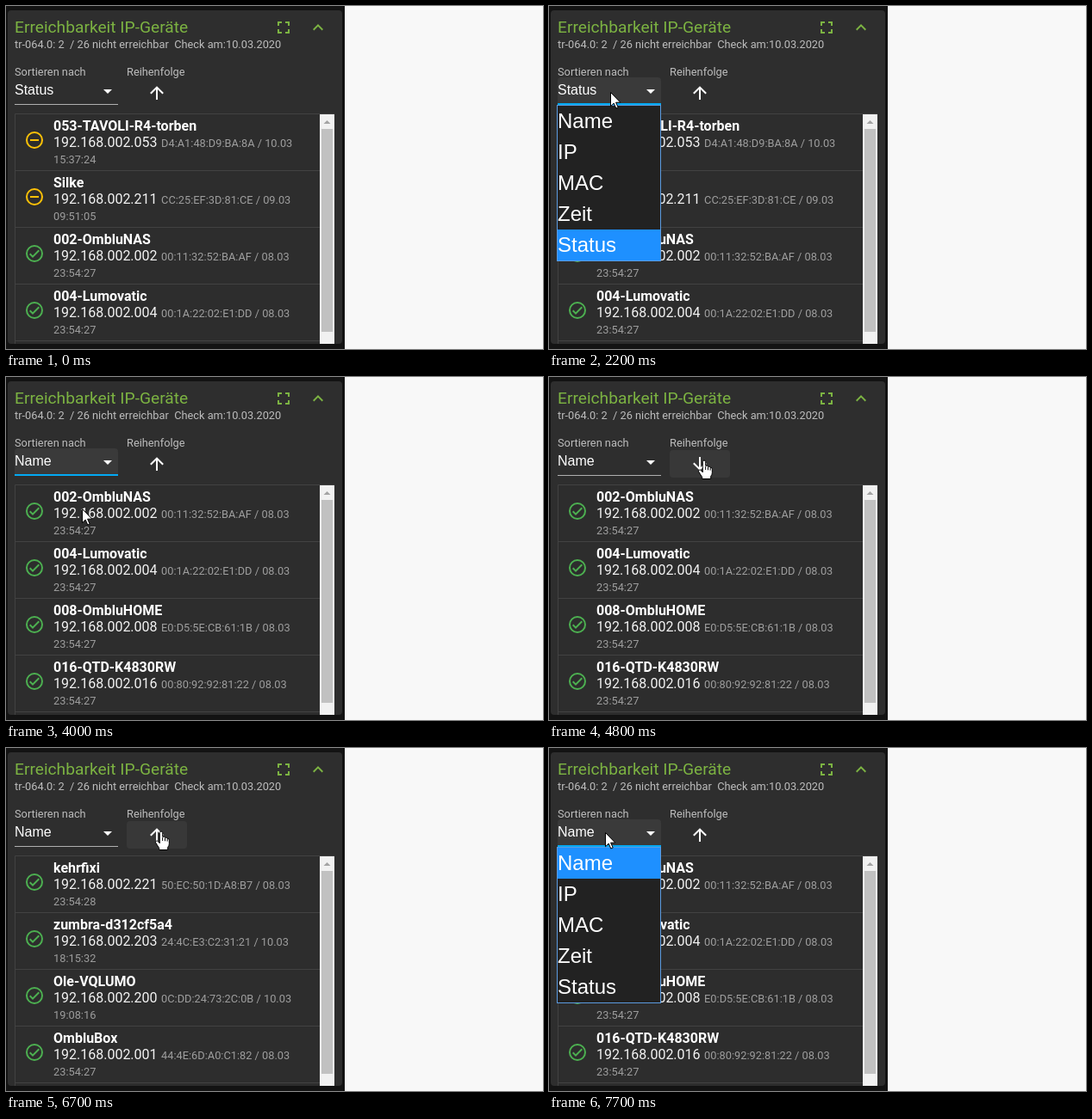
An HTML page that plays this animation: 623 px wide and 399 px high, repeating every 8 s.

```html
<!DOCTYPE html>
<html lang="de">
<head>
<meta charset="utf-8">
<title>Erreichbarkeit IP-Geräte</title>
<style>
html, body { margin: 0; width: 100%; height: 100%; overflow: hidden; background: #f8f8f8; }
svg { display: block; width: 623px; height: 399px; }
text { font-family: Roboto, sans-serif; font-size: 12.8px; fill: #bdbdbd; white-space: pre; }
.title { font-size: 19.2px; fill: #7cb342; }
.name { font-size: 16px; font-weight: 700; fill: #fff; }
.ip { font-size: 16px; fill: #f2f2f2; }
.dim { fill: #9e9e9e; }
.value { font: 16px "Liberation Sans", sans-serif; fill: #fff; }
.option { font: 24px "Liberation Sans", sans-serif; fill: #fff; }
.green { fill: #7cb342; }
.ok { color: #4caf50; }
.away { color: #ffc107; }
</style>
</head>
<body>
<svg viewBox="0 0 623 399">
  <defs>
    <clipPath id="card"><rect x="2" y="5" width="388" height="388" rx="4"/></clipPath>
    <clipPath id="button"><rect x="140" y="85" width="70" height="32" rx="4"/></clipPath>
    <g id="ok" fill="currentColor">
      <circle cx="12" cy="12" r="9" fill="none" stroke="currentColor" stroke-width="2"/>
      <path d="M16.59 7.58 10 14.17 7.41 11.59 6 13l4 4 8-8z"/>
    </g>
    <g id="away" fill="none" stroke="currentColor" stroke-width="2">
      <circle cx="12" cy="12" r="9"/>
      <path d="M7 12h10"/>
    </g>
  </defs>

  <rect width="393" height="399" fill="#131313"/>
  <g clip-path="url(#card)">
    <rect x="2" y="5" width="388" height="388" fill="#2e2e2e"/>
    <text class="title" x="10" y="31">Erreichbarkeit IP-Geräte</text>
    <text x="10" y="49">tr-064.0: 2  / 26 nicht erreichbar  Check am:10.03.2020</text>
    <path class="green" transform="translate(310 13)" d="M5 5h5v2H7v3H5zM14 5h5v5h-2V7h-3zM17 14h2v5h-5v-2h3zM10 17v2H5v-5h2v3z"/>
    <path class="green" transform="translate(350 13)" d="M7.41 15.41 12 10.83l4.59 4.58L18 14l-6-6-6 6z"/>

    <text x="10" y="81">Sortieren nach</text>
    <path id="selectFill" d="M10 115V87q0-4 4-4h112q4 0 4 4v28z" fill="#3a3a3a"/>
    <text id="value" class="value" x="10" y="103"></text>
    <path d="M113 97h10l-5 5z" fill="#fff"/>
    <rect x="10" y="114" width="120" height="1" fill="#b0b0b0"/>
    <rect id="focusLine" x="10" y="113" width="120" height="2" fill="#03a9f4"/>

    <text x="140" y="81">Reihenfolge</text>
    <g clip-path="url(#button)">
      <rect id="buttonFill" x="140" y="85" width="70" height="32" fill="#383838"/>
      <circle id="ripple" cx="175" cy="101" r="29" fill="#fff" opacity=".05"/>
    </g>
    <path id="order" d="M13 20h-2V8l-5.5 5.5-1.42-1.42L12 4.16l7.92 7.92-1.42 1.42L13 8z" fill="#fff"/>

    <rect x="10" y="125" width="371" height="270" fill="#2d2d2d"/>
    <path d="M10.5 393V125.5H381M10 191.5h354m-354 66h354m-354 66h354m-354 66h354" fill="none" stroke="#424242"/>
    <g id="lists"></g>
    <rect x="364" y="126" width="17" height="267" fill="#f1f1f1"/>
    <rect x="366" y="143" width="13" height="236" fill="#c1c1c1"/>
    <path d="M368.5 137h8l-4-4z" fill="#a3a3a3"/>
  </g>

  <g id="menu">
    <rect x="9.5" y="115.5" width="120" height="181" fill="#222" stroke="#5b9be0"/>
    <rect id="marked" x="10" width="119" height="36" fill="#1e90ff"/>
  </g>

  <path id="arrow" d="M.5.5v16.2l3.7-3.6 2.6 5.9 2.4-1-2.6-5.8h5.2z" fill="#fff" stroke="#000"/>
  <path id="hand" d="M-1.7 1.6q0-1.6 1.7-1.6t1.7 1.6V6.2q2.2-.6 2.8 1 2-.5 2.6 1 2.2-.3 2.2 2v4.3q0 2-1.6 4V21.500H-2.300V19.500L-6 13.800q-1.200-2 .3-2.700 1.300-.5 2.600 1.100L-1.700 13.800z M1.700 7v4m2.800-3.500v3.800m2.600-3v3.300" fill="#fff" stroke="#000"/>
</svg>

<script>
const LOOP = 8000, TICK = 100;
const $ = id => document.getElementById(id);

const tobias = ["away", "053-TAVOLI-R4-torben", "192.168.002.053", "D4:A1:48:D9:BA:8A / 10.03", "15:37:24"];
const silke = ["away", "Silke", "192.168.002.211", "CC:25:EF:3D:81:CE / 09.03", "09:51:05"];
const nas = ["ok", "002-OmbluNAS", "192.168.002.002", "00:11:32:52:BA:AF / 08.03", "23:54:27"];
const hub = ["ok", "004-Lumovatic", "192.168.002.004", "00:1A:22:02:E1:DD / 08.03", "23:54:27"];
const home = ["ok", "008-OmbluHOME", "192.168.002.008", "E0:D5:5E:CB:61:1B / 08.03", "23:54:27"];
const printer = ["ok", "016-QTD-K4830RW", "192.168.002.016", "00:80:92:92:81:22 / 08.03", "23:54:27"];
const vacuum = ["ok", "kehrfixi", "192.168.002.221", "50:EC:50:1D:A8:B7 / 08.03", "23:54:28"];
const speaker = ["ok", "zumbra-d312cf5a4", "192.168.002.203", "24:4C:E3:C2:31:21 / 10.03", "18:15:32"];
const laptop = ["ok", "Ole-VQLUMO", "192.168.002.200", "0C:DD:24:73:2C:0B / 10.03", "19:08:16"];
const router = ["ok", "OmbluBox", "192.168.002.001", "44:4E:6D:A0:C1:82 / 08.03", "23:54:27"];

const lists = {
  status: [tobias, silke, nas, hub],
  ascending: [nas, hub, home, printer],
  descending: [vacuum, speaker, laptop, router]
};

const row = ([icon, name, ip, mac, time], i) => `
  <g transform="translate(0 ${i * 66})">
    <use href="#${icon}" class="${icon}" x="21" y="144"/>
    <text class="name" x="55" y="145">${name}</text>
    <text class="ip" x="55" y="164">${ip}<tspan class="dim" dx="4.5" font-size="12.8" style="font-size:12.8px;fill:#9e9e9e">${mac}</tspan></text>
    <text class="dim" x="55" y="183">${time}</text>
  </g>`;

$("lists").innerHTML = Object.entries(lists)
  .map(([key, rows]) => `<g id="${key}">${rows.map(row).join("")}</g>`).join("");
$("menu").insertAdjacentHTML("beforeend", ["Name", "IP", "MAC", "Zeit", "Status"]
  .map((label, i) => `<text class="option" x="10" y="${142 + i * 36}">${label}</text>`).join(""));

// Each move: start time, then one pointer position per tick.
const moves = [
  [500, [348, 24], [335, 35], [315, 48], [292, 60], [268, 72], [240, 84], [209, 94], [170, 106], [136, 111],
    [100, 108], [78, 102], [71, 100]],
  [2700, [70, 108], [64, 122], [59, 129]],
  [3800, [62, 136], [72, 147], [88, 153], [108, 150], [128, 140], [146, 127], [160, 113], [172, 103], [180, 97]],
  [7300, [150, 102], [105, 104], [75, 100], [65, 98]]
];

const pointerAt = t => {
  const move = moves.filter(m => m[0] <= t).pop();
  if (!move) return null;
  const [start, ...points] = move;
  return points[Math.min(Math.floor((t - start) / TICK), points.length - 1)];
};
const within = (t, ...spans) => spans.some(([from, to]) => t >= from && t < to);
const inside = (p, x, y, w, h) => !!p && p[0] >= x && p[0] < x + w && p[1] >= y && p[1] < y + h;
const show = (id, on) => $(id).setAttribute("visibility", on ? "visible" : "hidden");

function draw(t) {
  const p = pointerAt(t);
  const open = within(t, [2200, 3100], [7700, LOOP]);
  const focus = within(t, [2200, 4700], [7700, LOOP]);
  const overButton = inside(p, 140, 85, 70, 32);
  const list = t < 3200 ? "status" : within(t, [4900, 6800]) ? "descending" : "ascending";

  Object.keys(lists).forEach(key => show(key, key === list));
  $("value").textContent = t < 3100 ? "Status" : "Name";
  show("selectFill", focus || inside(p, 10, 83, 120, 32));
  show("focusLine", focus);
  show("buttonFill", overButton);
  show("ripple", within(t, [4900, 5200], [6800, 7100]));
  $("order").setAttribute("transform",
    `translate(175 101) rotate(${within(t, [4800, 6700]) ? 180 : 0}) translate(-12 -12)`);

  show("menu", open);
  show("marked", open);
  $("marked").setAttribute("y", t < 2800 ? 260 : 116);

  show("arrow", p && !overButton);
  show("hand", overButton);
  if (p) $(overButton ? "hand" : "arrow").setAttribute("transform", `translate(${p})`);
}

function frame() {
  draw(performance.now() % LOOP);
  requestAnimationFrame(frame);
}
frame();
</script>
</body>
</html>
```
